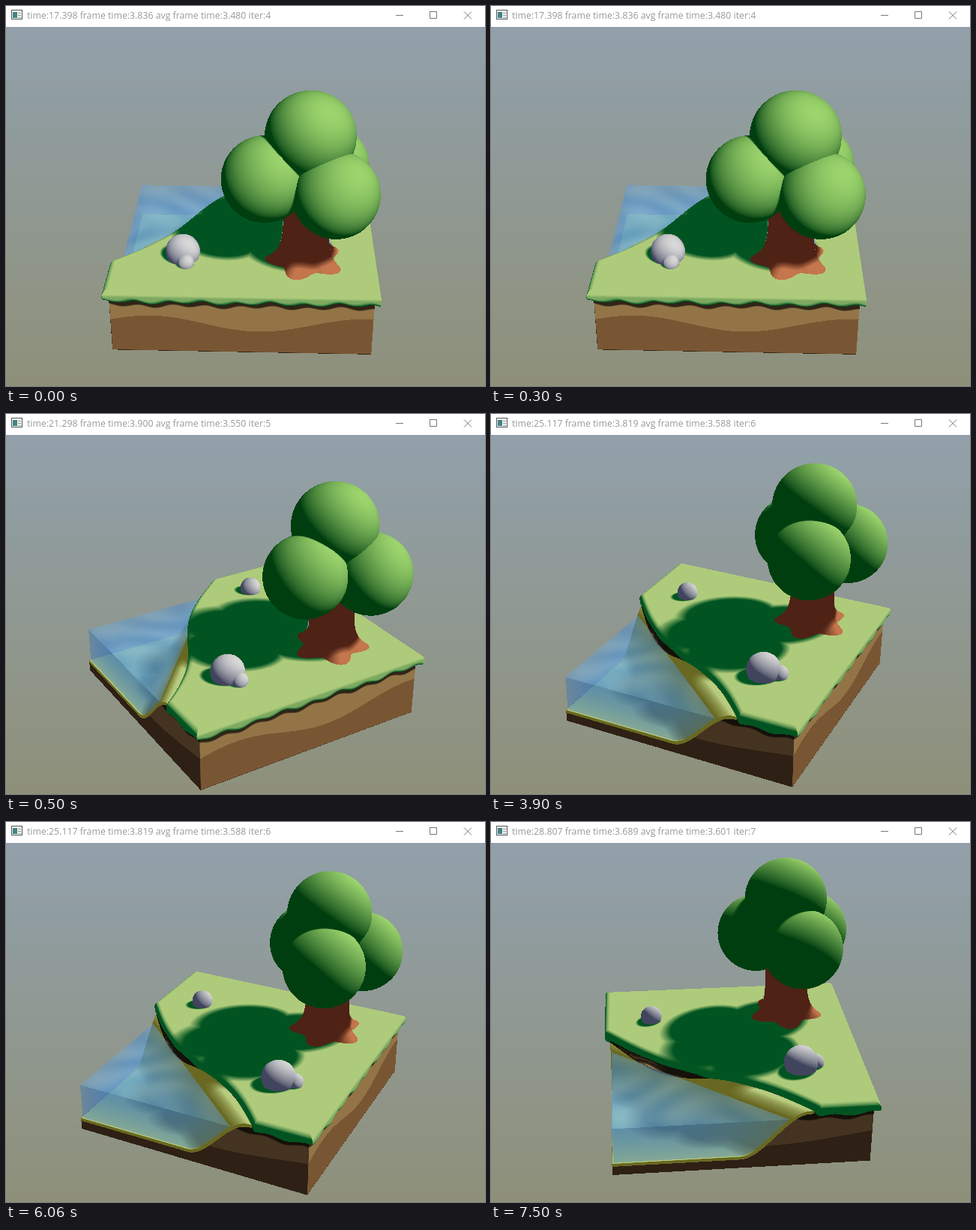
These frames come from a looping animation (639 px wide and 508 px high, 8000 ms). An HTML page with a canvas:

```html
<!DOCTYPE html>
<html lang="en">
<head>
<meta charset="utf-8">
<title>Island turntable</title>
<style>
html, body { margin: 0; width: 100%; height: 100%; overflow: hidden; background: #fff; }
svg, canvas { display: block; }
text { font: 12.3px "Open Sans", "Noto Sans", sans-serif; fill: #999; }
</style>
</head>
<body>
<svg width="639" height="28">
  <rect x="7.5" y="5.5" width="14" height="12" fill="#f4f6f6" stroke="#555"/>
  <rect x="9" y="8" width="6" height="8" fill="#3f8584"/>
  <path d="M16 9.5h4M16 12.5h4M16 15.5h4" stroke="#999"/>
  <path d="M520 12.5h10M565.5 7.5h9v9h-9zM611 7.5l10 10M621 7.5l-10 10" fill="none" stroke="#777"/>
  <text x="28" y="17"></text>
</svg>
<canvas width="639" height="480"></canvas>
<script>
// A small ray tracer: one island, seen by a camera that orbits with the clock in the title.
const LOOP = 8000, W = 639, H = 480;
const FOCAL = 1397, DISTANCE = 8.5, PITCH = 0.495;
const views = [
  { from: 0, time: 17.398, cost: 3.836, mean: 3.480, iter: 4 },
  { from: 500, time: 21.298, cost: 3.900, mean: 3.550, iter: 5 },
  { from: 3900, time: 25.117, cost: 3.819, mean: 3.588, iter: 6 },
  { from: 7500, time: 28.807, cost: 3.689, mean: 3.601, iter: 7 }
];

const { sin, cos, abs, min, max, exp, hypot, sqrt } = Math;
const clamp = v => min(1, max(0, v));
const smooth = (a, b, v) => { const t = clamp((v - a) / (b - a)); return t * t * (3 - 2 * t); };
const mix = (a, b, t) => a.map((v, k) => v + (b[k] - v) * t);
const dot = (a, b) => a[0] * b[0] + a[1] * b[1] + a[2] * b[2];
const sub = (a, b) => [a[0] - b[0], a[1] - b[1], a[2] - b[2]];
const along = (o, d, t) => [o[0] + d[0] * t, o[1] + d[1] * t, o[2] + d[2] * t];
const unit = a => { const l = hypot(...a); return [a[0] / l, a[1] / l, a[2] / l]; };

const SUN = unit([0.41, 0.8, 0.495]);
const TOP = -0.18, BOTTOM = -0.73, WATER = -0.32;
const TREE = [0.48, TOP, 0.52];

// Colours in full shade and in full light.
const paint = {
  leaf: [[0, 62, 15], [156, 212, 109]],
  rock: [[64, 68, 92], [216, 216, 216]],
  grass: [[1, 84, 33], [174, 203, 123]],
  bark: [[78, 34, 21], [196, 118, 76]],
  clay: [[67, 51, 32], [178, 142, 86]],
  earth: [[46, 32, 20], [151, 108, 63]],
  bed: [[104, 104, 34], [184, 204, 126]]
};

const ball = (kind, r, ...c) => ({ kind, r, c });
const balls = [
  ball('leaf', 0.335, 0.49, 0.86, 0.5),
  ball('leaf', 0.322, 0.16, 0.555, 0.6),
  ball('leaf', 0.322, 0.68, 0.5, 0.73),
  ball('leaf', 0.322, 0.63, 0.51, 0.275),
  ball('rock', 0.133, -0.47, -0.126, 0.51),
  ball('rock', 0.063, -0.435, -0.15, 0.635),
  ball('rock', 0.088, 0.44, -0.145, -0.635)
];
// Stand-ins for the trunk, used for shadows only.
const stem = [0.02, 0.17].map(y => ball('bark', 0.17, TREE[0], y, TREE[2]));

const bankAt = (x, z) => (x + 0.856 * z + 0.59 - 0.1 * sin(3.6 * z + 0.6)) / 1.4;
const bedAt = (x, z) => -0.63 + 0.38 * smooth(-1, -0.55, x + 0.856 * z);
const fringeAt = (x, z) => -0.28 + 0.012 * sin(25 * x + 21 * z) + 0.006 * sin(11 * x - 13 * z);

let kind = '';
// Distance to the marched parts; leaves the nearest part's name in kind.
function map(x, y, z) {
  const bank = bankAt(x, z), reach = max(abs(x), abs(z));
  const low = fringeAt(x, z), half = (TOP - low) / 2, round = 0.042;
  const side = max(reach - 1.03, -bank) + round;
  const rise = abs(y - (TOP + low) / 2) - half + round;
  const grass = hypot(max(side, 0), max(rise, 0)) + min(max(side, rise), 0) - round;

  const bed = bank > 0 ? -0.25 : bedAt(x, z);
  const soil = max(reach - 0.985, BOTTOM - y, (y - bed) * 0.6);

  const dx = x - TREE[0], dz = z - TREE[2], rho = hypot(dx, dz);
  let bark = rho - 0.36;
  if (rho < 0.5) {
    const root = 0.5 + 0.5 * cos(5 * (Math.atan2(dx, dz) + 0.3));
    const r = 0.172 + (0.04 + 0.1 * root) * exp(-max(0, y - TOP) / 0.08);
    bark = max((rho - r) * 0.6, y - 0.36);
  }
  const d = min(grass, soil, bark);
  kind = d === grass ? 'grass' : d === bark ? 'bark' : 'soil';
  return d;
}
function march(o, d, near, far) {
  for (let i = 0, t = near; i < 70 && t < far; i++) {
    const step = map(o[0] + d[0] * t, o[1] + d[1] * t, o[2] + d[2] * t);
    if (step < 0.0015) return t;
    t += step * 0.85;
  }
  return Infinity;
}
function slope([x, y, z]) {
  const e = 0.004;
  return unit([
    map(x + e, y, z) - map(x - e, y, z),
    map(x, y + e, z) - map(x, y - e, z),
    map(x, y, z + e) - map(x, y, z - e)
  ]);
}
function hitBox(o, d, wide, low, high) {
  let near = 0, far = Infinity;
  for (let k = 0; k < 3; k++) {
    const a = ((k === 1 ? low : -wide) - o[k]) / d[k];
    const b = ((k === 1 ? high : wide) - o[k]) / d[k];
    near = max(near, min(a, b));
    far = min(far, max(a, b));
  }
  return far > near ? [near, far] : null;
}
function hitBall(o, d, { c, r }) {
  const v = sub(c, o), b = dot(v, d), q = r * r - dot(v, v) + b * b;
  return q > 0 ? b - sqrt(q) : Infinity;
}

// Share of sunlight reaching p, with edges that soften over distance.
function sunAt(p, skip, blockers) {
  let light = 1;
  for (const b of blockers) {
    if (b === skip) continue;
    const v = sub(b.c, p), ahead = dot(v, SUN);
    if (ahead < 0) continue;
    const miss = sqrt(max(0, dot(v, v) - ahead * ahead));
    light = min(light, clamp((miss - b.r) / (0.015 + 0.06 * ahead) + 0.5));
  }
  return light;
}
const allBlockers = [...balls, ...stem];

function shadeBall(p, b) {
  const n = unit(sub(p, b.c));
  const bump = b.kind === 'leaf' ? 0.07 : 0.16, f = 1.8 / b.r;
  const m = unit([n[0] + bump * sin(f * p[1]), n[1] + bump * sin(f * p[2] + 1), n[2] + bump * sin(f * p[0] + 2)]);
  const sun = max(0, dot(m, SUN)) ** 0.75 * sunAt(p, b, balls);
  return mix(...paint[b.kind], sun);
}
function shadeGround(p) {
  const [x, y, z] = p;
  map(x, y, z);
  let part = kind, dim = 1;
  const n = slope(p);
  if (part === 'soil') {
    const layer = -0.475 + 0.065 * cos(3.9 * (x + 0.69 + 0.6 * (z - 1)));
    if (bankAt(x, z) < 0 && y > bedAt(x, z) - 0.025) part = 'bed';
    else {
      part = y > layer ? 'clay' : 'earth';
      dim = 1 - 0.68 * smooth(-0.05, -0.035, y - fringeAt(x, z));
    }
  }
  const blockers = part === 'bark' ? balls : allBlockers;
  const sun = clamp(dot(n, SUN) / 0.78) ** 0.7 * sunAt(p, null, blockers);
  return mix(...paint[part], sun).map(v => v * dim);
}
function shadeWater(p, depth, behind) {
  const [x, y, z] = p;
  if (y < WATER - 0.001) return mix(behind, [56, 116, 184], 0.4 + 0.5 * (1 - exp(-1.6 * depth)));
  const wave = sin(8 * x + 2 * sin(5 * z)) * sin(7 * z + 1.5 * sin(6 * x));
  return mix(behind, [90 + 26 * wave, 156 + 20 * wave, 216 + 9 * wave], 0.42 + 0.45 * (1 - exp(-1.8 * depth)));
}

function trace(o, d, sky) {
  let t = Infinity, hit = null, color = sky;
  for (const b of balls) {
    const s = hitBall(o, d, b);
    if (s < t) { t = s; hit = b; }
  }
  const bounds = hitBox(o, d, 1.04, BOTTOM - 0.01, 0.37);
  const ground = bounds ? march(o, d, bounds[0], min(bounds[1], t)) : Infinity;
  if (ground < t) {
    t = ground;
    color = shadeGround(along(o, d, t));
  } else if (hit) {
    color = shadeBall(along(o, d, t), hit);
  }
  const water = hitBox(o, d, 0.975, BOTTOM + 0.02, WATER);
  if (water && water[0] < t) {
    color = shadeWater(along(o, d, water[0]), min(t, water[1]) - water[0], color);
  }
  return color;
}

function render(time) {
  const yaw = -0.0314 + 0.1487 * (time - views[0].time);
  const turn = (x, y, z) => [x * cos(yaw) - z * sin(yaw), y, x * sin(yaw) + z * cos(yaw)];
  const cp = cos(PITCH), sp = sin(PITCH);
  const eye = turn(0, DISTANCE * sp, DISTANCE * cp);
  const image = new ImageData(W, H);
  for (let py = 0, i = 0; py < H; py++) {
    const sky = mix([145, 160, 170], [142, 144, 121], py / H);
    const v = (H / 2 - py - 0.5) / FOCAL;
    for (let px = 0; px < W; px++, i += 4) {
      const u = (px + 0.5 - W / 2) / FOCAL;
      const ray = unit(turn(u, v * cp - sp, -v * sp - cp));
      image.data.set(trace(eye, ray, sky), i);
      image.data[i + 3] = 255;
    }
  }
  return image;
}

const canvas = document.querySelector('canvas').getContext('2d');
const title = document.querySelector('text');
let shown = null;
function update(ms) {
  const t = ms % LOOP;
  const view = views.filter(v => t >= v.from).pop();
  if (view === shown) return;
  shown = view;
  view.image ??= render(view.time);
  canvas.putImageData(view.image, 0, 0);
  const [time, cost, mean] = [view.time, view.cost, view.mean].map(v => v.toFixed(3));
  title.textContent = `time:${time} frame time:${cost} avg frame time:${mean} iter:${view.iter}`;
}
const start = performance.now();
function tick() {
  update(performance.now() - start);
  requestAnimationFrame(tick);
}
tick();
</script>
</body>
</html>
```
